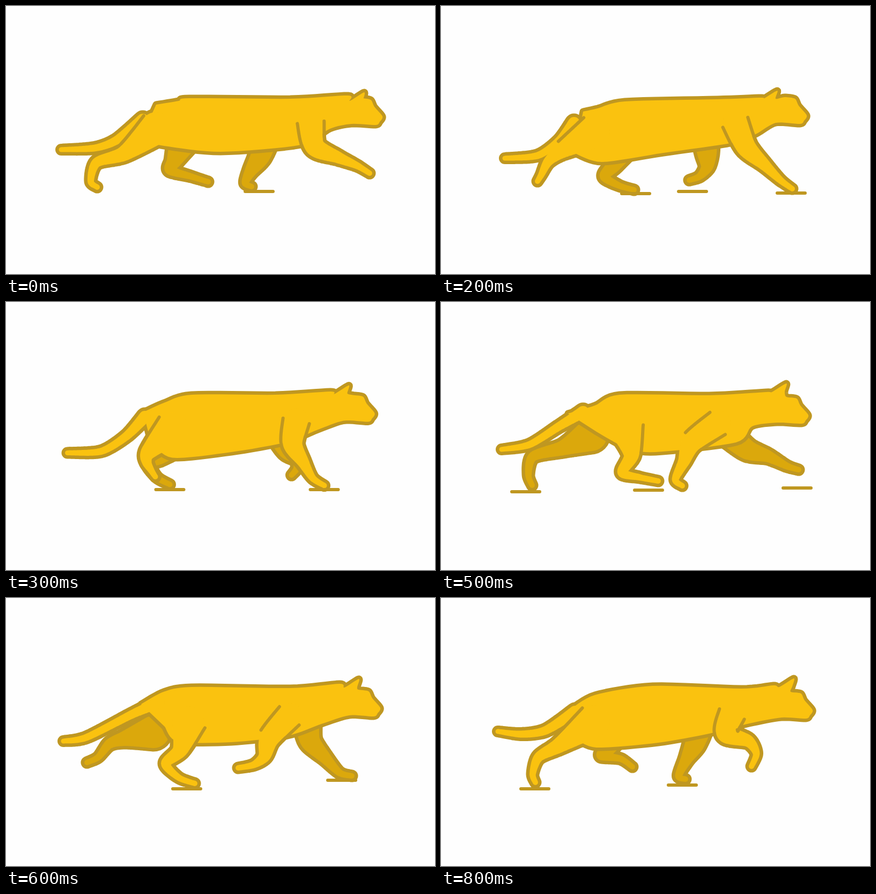
Write an HTML page with a canvas that moves like this. It is 800 by 500 pixels and loops after 900 ms.

```html
<!DOCTYPE html>
<html lang="en">
<head>
<meta charset="utf-8">
<title>Running cat</title>
<style>
  html, body { margin: 0; width: 100%; height: 100%; overflow: hidden; background: #fefefe; }
  canvas { display: block; }
</style>
</head>
<body>
<canvas id="stage" width="800" height="500"></canvas>
<script>
const STEP = 100, EDGE = 6.5, TENSION = 0.4;
const LINE = '#bf9721', NEAR = '#fac20f', FAR = '#dba80c';

const points = run => run.split(' ').map(pair => pair.split(',').map(Number));

// Thickness at each joint, from the body outwards.
const RADII = { tail: [11, 8, 6.5, 4.5], Hind: [30, 14, 9, 6, 5], Fore: [22, 18, 11, 6.5, 5] };

// Brow, muzzle and throat relative to the nose; ear base relative to its tip.
const HEAD = points('-45,-33 -26,-30 -19,-17 -4,1 -9,11 -17,17 -62,15');
const EAR = points('-27,16 0,0 -3,15');

// Key poses of one skeleton: joints of each limb, plus the lines of back and belly.
const reach = {
  tail: '255,212 205,251 165,265 103,268',
  back: '280,184 322,177 342,172 530,173 638,167',
  ear: '668,161', nose: '706,205',
  belly: '604,229 550,259 400,272 295,261 250,250',
  nearHind: '280,228 220,275 169,292 158,327 170,338',
  nearFore: '568,215 576,262 618,282 655,298 678,312',
  farHind: '336,240 314,288 306,306 345,318 377,328',
  farFore: '488,240 474,280 456,308 446,330 458,337',
  ground: '472,346'
};
const land = {
  tail: '248,218 220,252 180,279 119,284',
  back: '265,197 292,191 343,178 515,174 598,171',
  ear: '627,158', nose: '686,203',
  belly: '587,239 545,255 415,274 300,291 250,275',
  nearHind: '285,235 225,270 200,290 187,315 180,327',
  nearFore: '548,215 569,263 602,295 633,325 655,341',
  farHind: '340,255 322,296 305,318 332,335 360,343',
  farFore: '493,245 496,275 496,300 482,318 463,325',
  ground: '363,350 469,346 653,349'
};
const stand = {
  tail: '270,210 228,249 175,278 110,279',
  back: '247,214 300,184 349,168 490,172 612,163',
  ear: '652,153', nose: '697,210',
  belly: '572,239 500,268 425,286 320,290 290,248',
  nearHind: '335,238 306,290 325,307 355,314 377,325',
  nearFore: '535,225 500,265 505,300 511,332 532,344',
  farHind: '285,262 252,281 227,287 232,320 251,338',
  farFore: '530,255 555,276 590,284 603,302 602,321',
  ground: '237,350 380,349 520,353'
};
const stretch = {
  tail: '265,205 220,232 165,266 113,275',
  back: '237,208 287,193 333,173 500,174 606,168',
  ear: '644,152', nose: '689,210',
  belly: '580,232 550,262 400,280 345,272 290,242',
  nearHind: '345,235 355,285 338,318 370,327 405,334',
  nearFore: '518,225 468,262 453,297 437,331 450,343',
  farHind: '280,248 228,272 172,288 163,322 170,342',
  farFore: '540,250 572,276 610,288 645,306 667,313',
  ground: '158,354 387,351 664,347'
};
const push = {
  tail: '285,195 235,217 150,260 107,267',
  back: '252,198 294,175 346,166 530,168 622,160',
  ear: '658,151', nose: '702,204',
  belly: '588,235 525,257 420,269 320,268 296,240',
  nearHind: '340,232 325,283 298,309 322,335 352,346',
  nearFore: '530,218 491,262 482,295 462,311 433,317',
  farHind: '275,250 222,262 193,272 172,297 151,307',
  farFore: '562,240 568,268 595,298 622,326 645,332',
  ground: '337,356 626,340'
};
const gather = {
  tail: '250,212 195,247 150,254 106,249',
  back: '238,210 287,181 395,164 560,169 620,163',
  ear: '658,150', nose: '697,208',
  belly: '575,234 500,253 405,270 290,279 250,262',
  nearHind: '285,230 220,275 182,297 171,328 176,344',
  nearFore: '543,215 532,252 573,267 588,290 579,314',
  farHind: '320,248 308,284 300,294 335,300 357,315',
  farFore: '485,235 473,272 458,300 443,332 456,338',
  ground: '175,356 450,349'
};

const mapValues = (obj, fn) =>
  Object.fromEntries(Object.entries(obj).map(([key, value]) => [key, fn(value, key)]));
const shift = (pts, [[dx, dy]]) => pts.map(([x, y]) => [x + dx, y + dy]);
const parse = pose => mapValues(pose, points);

// Halfway pose; every paw that is low enough gets a mark on the ground.
function between(a, b) {
  const { ground, ...joints } = a;
  const mid = mapValues(joints, (pts, key) =>
    pts.map((p, i) => p.map((v, c) => (v + b[key][i][c]) / 2)));
  mid.ground = ['nearHind', 'nearFore', 'farHind', 'farFore']
    .map(name => mid[name].at(-1))
    .filter(toe => toe[1] > 330)
    .map(([x]) => [x, 350]);
  return mid;
}

// Samples of a smooth curve through points of any dimension.
function spline(pts, steps) {
  const at = i => pts[Math.max(0, Math.min(pts.length - 1, i))];
  const out = [];
  for (let i = 0; i < pts.length - 1; i++) {
    for (let k = 0; k < steps; k++) {
      const t = k / steps, u = 1 - t;
      out.push(at(i).map((b, c) => {
        const next = at(i + 1)[c];
        const leave = TENSION * (next - at(i - 1)[c]);
        const arrive = TENSION * (at(i + 2)[c] - b);
        return b * u * u * (1 + 2 * t) + next * t * t * (3 - 2 * t) +
          leave * t * u * u - arrive * t * t * u;
      }));
    }
  }
  return [...out, pts.at(-1)];
}

function polyline(pts) {
  const path = new Path2D();
  pts.forEach(([x, y]) => path.lineTo(x, y));
  return path;
}

const withRadii = (joints, radii) => spline(joints.map((p, i) => [...p, radii[i]]), 36);

// A tapering limb is a row of overlapping discs.
function limb(samples) {
  const path = new Path2D();
  for (const [x, y, r] of samples) {
    path.moveTo(x + r, y);
    path.arc(x, y, r, 0, 2 * Math.PI);
  }
  return path;
}

// The edge of a limb's upper half, drawn where it crosses the body.
function crease(samples, side) {
  return polyline(samples.slice(3, 34).map(([x, y, r], i) => {
    const [nx, ny] = samples[i + 4];
    const dx = nx - x, dy = ny - y, k = side * (r + EDGE / 2) / Math.hypot(dx, dy);
    return [x - dy * k, y + dx * k];
  }));
}

function compile(pose) {
  const rows = {};
  for (const side of ['near', 'far'])
    for (const end of ['Hind', 'Fore'])
      rows[side + end] = withRadii(pose[side + end], RADII[end]);
  const tail = withRadii(pose.tail, RADII.tail);

  const torso = polyline(spline(
    [...pose.back, ...shift(EAR, pose.ear), ...shift(HEAD, pose.nose), ...pose.belly], 8));
  torso.closePath();

  const trailing = pose.nearHind.at(-1)[0] < pose.nearHind[0][0];
  return {
    torso,
    far: [rows.farHind, rows.farFore].map(limb),
    near: [tail, rows.nearHind, rows.nearFore].map(limb),
    lines: [
      crease(rows.nearHind, trailing ? 1 : -1),
      crease(rows.nearFore, 1),
      crease(rows.nearFore, -1),
      ...pose.ground.map(([x, y]) => polyline([[x - 26, y], [x + 26, y]]))
    ],
    swell: new Map([tail, ...Object.values(rows)].map(row => [row, limb(row)]))
  };
}

const [p0, p2, p4, p5, p6, p8] = [reach, land, stand, stretch, push, gather].map(parse);
const cycle = [p0, between(p0, p2), p2, between(p2, p4), p4, p5, p6, between(p6, p8), p8]
  .map(compile);

const ctx = document.getElementById('stage').getContext('2d');
ctx.lineCap = ctx.lineJoin = 'round';
ctx.strokeStyle = LINE;

// Outline all shapes first, then fill them, so that they merge into one silhouette.
function paint(shapes, fill) {
  ctx.lineWidth = 2 * EDGE;
  shapes.forEach(shape => ctx.stroke(shape));
  ctx.fillStyle = fill;
  shapes.forEach(shape => ctx.fill(shape));
}

function draw({ torso, far, near, lines }) {
  ctx.clearRect(0, 0, 800, 500);
  far.forEach(leg => paint([leg], FAR));
  paint([torso, ...near], NEAR);
  ctx.lineWidth = 6;
  lines.forEach(line => ctx.stroke(line));
}

const start = performance.now();
let shown = -1;
function tick() {
  const elapsed = Math.max(0, performance.now() - start);
  const index = Math.floor(elapsed / STEP) % cycle.length;
  if (index !== shown) draw(cycle[shown = index]);
  requestAnimationFrame(tick);
}
tick();
</script>
</body>
</html>
```
